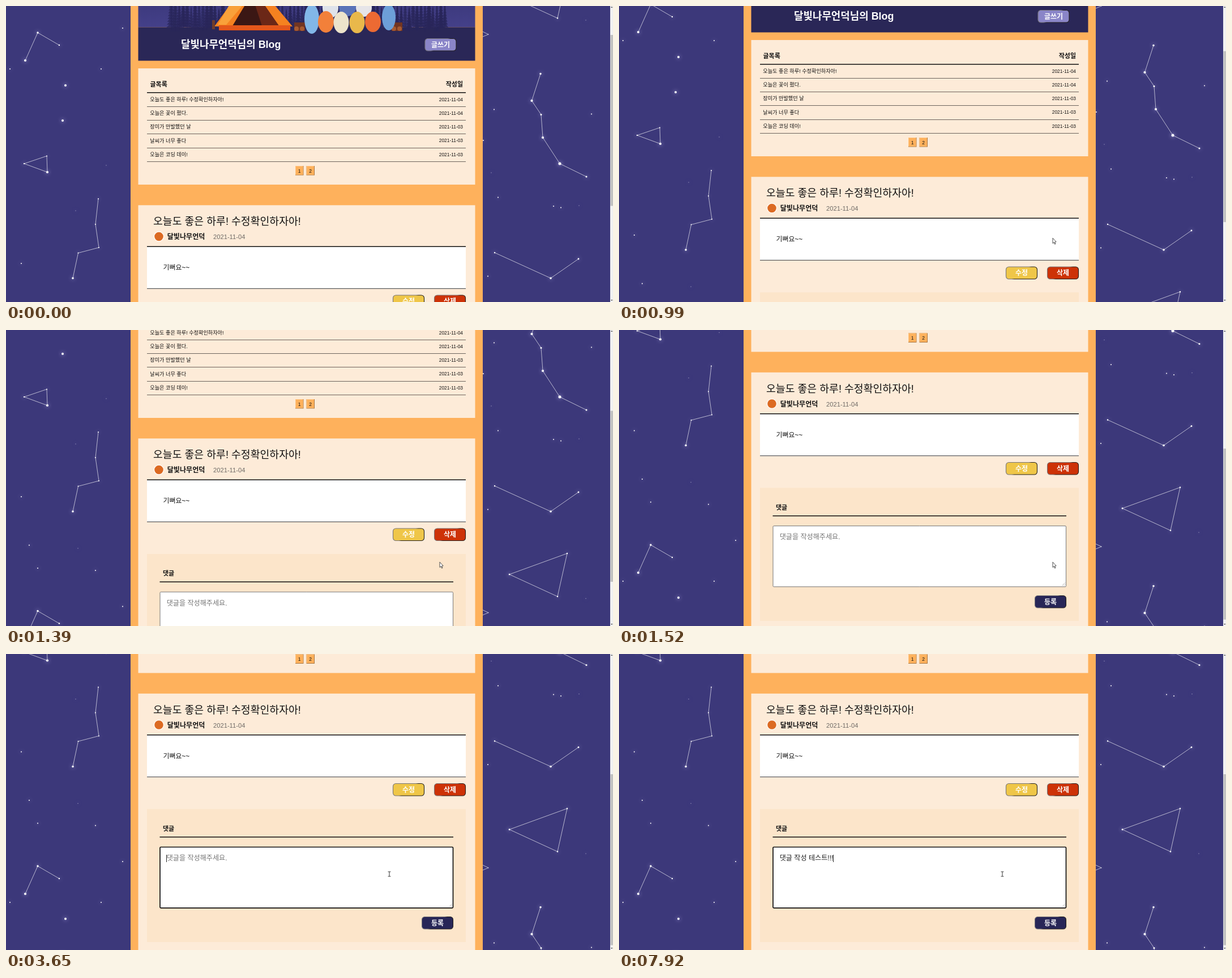
Recreate the animation shown at these times as an HTML page with a canvas. Size 1072x522 px, loop 8 s.

```html
<!DOCTYPE html>
<html lang="ko">
<head>
<meta charset="utf-8">
<title>Blog</title>
<style>
  html, body { margin: 0; width: 100%; height: 100%; overflow: hidden; background: #3c387a; }
  canvas { display: block; }
</style>
</head>
<body>
<canvas id="stage" width="1072" height="522"></canvas>
<script>
const ctx = document.getElementById('stage').getContext('2d');
const W = 1072, H = 522, LOOP = 8000, TILE = 608.5;
const FONT = '"Liberation Sans", "Noto Sans CJK KR", "Noto Sans CJK", sans-serif';
const USER = '달빛나무언덕';
const ORANGE = '#feb15c';

// [time, value] lists with hard steps
const scrollSteps = [[0, 0], [780, 5], [850, 19.7], [920, 38], [980, 50], [1050, 55.8], [1250, 57],
  [1320, 92], [1380, 160], [1450, 240], [1520, 276.5], [1580, 281.5]];
// A trailing underscore marks the syllable still being composed
const typingSteps = [[0, ''], [4100, '대_'], [4430, '댓_'], [4650, '댓그_'], [4920, '댓글_'], [5010, '댓글'],
  [5100, '댓글 '], [5190, '댓글 ㅈ_'], [5290, '댓글 자_'], [5380, '댓글 작_'], [5580, '댓글 잓_'],
  [5720, '댓글 작성_'], [5850, '댓글 작성 '], [6050, '댓글 작성 ㅌ_'], [6120, '댓글 작성 테_'],
  [6320, '댓글 작성 텟_'], [6390, '댓글 작성 테스_'], [6730, '댓글 작성 테슽_'], [6930, '댓글 작성 테스트_'],
  [7460, '댓글 작성 테스트'], [7590, '댓글 작성 테스트!'], [7790, '댓글 작성 테스트!!'], [7920, '댓글 작성 테스트!!!']];
const caretSteps = [[0, false], [2730, true], [3120, false], [3650, true]];
const at = (steps, t) => steps.findLast(([start]) => start <= t)[1];

// Constellations: points are x, y, radius
const constellations = [
  [[34, 96, 2.1], [56, 47, 1.7], [94, 69, 1.2]],
  [[32, 278, 1], [72, 264.5, 1], [73, 293, 2.1], [32, 278, 1]],
  [[163, 340, 1], [158, 385, 1], [164, 426, 1], [127.5, 435.5, 1], [118, 480, 1.8]],
  [[944, 119.5, 1.7], [928.5, 167, 2.1], [945, 191.5, 1.5], [948, 232, 2.1], [978, 278, 2.5], [1025, 301, 1.5]],
  [[863, 435, 1.2], [962, 480, 1.8], [1011, 446, 1.4]],
  [[889, 591, 1.2], [991, 554, 1.2], [974, 630, 1.2], [889, 591, 1.2]],
  [[835, 42, 0], [852, 50, .6], [835, 57, 0]],
];
const loneStars = [[206, 39], [7, 111], [168, 111], [27, 454], [41, 539.5], [56, 580], [158, 584],
  [862, 182.5], [1034, 190.5], [843, 237], [869, 337.5], [967, 353], [980, 355.5], [851, 476.5]];
const faintStars = [[177, 281], [123, 361], [127, 545], [857, 294], [1012, 352], [1024, 25]];
const brightStars = [[105, 140], [100, 202]];

function rect(x, y, w, h, fill) {
  ctx.fillStyle = fill;
  ctx.fillRect(x, y, w, h);
}
function poly(fill, ...points) {
  ctx.beginPath();
  points.forEach(([x, y]) => ctx.lineTo(x, y));
  ctx.closePath();
  ctx.fillStyle = fill;
  ctx.fill();
}
function oval(x, y, rx, ry, fill) {
  ctx.beginPath();
  ctx.ellipse(x, y, rx, ry, 0, 0, 7);
  ctx.fillStyle = fill;
  ctx.fill();
}
// Text placed by its vertical middle
function text(str, x, middle, size, { color = '#111', weight = 400, align = 'left' } = {}) {
  ctx.font = `${weight} ${size}px ${FONT}`;
  ctx.textAlign = align;
  ctx.fillStyle = color;
  ctx.fillText(str, x, middle + size * .37);
}
function button(label, x, y, fill) {
  const w = 56, h = 22.5;
  const bevel = ctx.createLinearGradient(x + w / 2 - 8, y, x + w / 2 + 8, y + h);
  bevel.addColorStop(.45, '#77757a');
  bevel.addColorStop(.55, '#24211f');
  ctx.beginPath();
  ctx.roundRect(x + .5, y + .5, w - 1, h - 1, 5);
  ctx.fillStyle = fill;
  ctx.fill();
  ctx.strokeStyle = bevel;
  ctx.lineWidth = 1.1;
  ctx.stroke();
  text(label, x + w / 2, y + h / 2, 12, { color: '#fff', weight: 700, align: 'center' });
}
function pageButton(label, x) {
  rect(x, 282, 14.5, 16.5, '#a8753f');
  rect(x, 282, 13.5, 15.5, '#ffc583');
  rect(x + 1, 283, 12.5, 14.5, ORANGE);
  text(label, x + 7.2, 290.5, 8.6, { align: 'center' });
}

function drawSky() {
  const star = (x, y, r) => oval(x, y, r, r, '#fff');
  ctx.strokeStyle = 'rgba(255,255,255,.8)';
  ctx.lineWidth = .8;
  for (const points of constellations) {
    ctx.beginPath();
    points.forEach(([x, y]) => ctx.lineTo(x, y));
    ctx.stroke();
  }
  ctx.save();
  ctx.shadowColor = '#c8c4ff';
  ctx.shadowBlur = 7;
  constellations.flat().forEach(p => star(...p));
  loneStars.forEach(([x, y]) => star(x, y, 1));
  brightStars.forEach(([x, y]) => star(x, y, 2));
  ctx.globalAlpha = .5;
  faintStars.forEach(([x, y]) => star(x, y, .7));
  ctx.restore();
}

function drawTrees() {
  let seed = 11;
  const random = () => (seed = seed * 16807 % 2147483647) / 2147483647;
  for (let x = 292; x < 782; x += 7) {
    const top = -22 + random() * 30, foot = 38 + random() * 7;
    ctx.globalAlpha = .6 + random() * .4;
    for (let y = top; y < foot - 4; y += 5) {
      const half = 1.5 + (y - top) * .13;
      poly('#29265a', [x, y - 4], [x + half, y + 5], [x - half, y + 5]);
    }
    rect(x - .6, top, 1.2, foot - top, '#29265a');
  }
  ctx.globalAlpha = 1;
}

function drawBanner() {
  const sky = ctx.createLinearGradient(0, -20, 0, 37);
  sky.addColorStop(0, '#3a3779');
  sky.addColorStop(1, '#444089');
  ctx.save();
  ctx.beginPath();
  ctx.rect(233.5, -300, 595, 396.5);
  ctx.clip();
  rect(233, -300, 596, 337.5, sky);
  rect(233, 37.5, 596, 60, '#2a2757');
  drawTrees();

  // Tent
  poly('#d9480f', [376, 34], [502, 34], [502, 43], [376, 43]);
  poly('#f58220', [400, -8], [469, -8], [506, 36], [368, 36]);
  poly('#3b1714', [426, -8], [452, -8], [482, 35], [400, 35]);
  poly('#6b2717', [438, -8], [452, -8], [482, 35], [452, 35]);
  poly('#f9a13a', [398, -8], [424, -8], [389, 33], [374, 33]);
  rect(376, 34, 126, 8.5, '#e4571b');
  rect(364, 25, 5, 16, '#6e3b2b');

  // Logs
  for (const x of [509, 681]) {
    rect(x, 29, 19, 15, '#713522');
    oval(x + 4, 40, 4, 4, '#a75a31');
    oval(x + 14, 40, 4, 4, '#a75a31');
  }

  // Campers as plain shapes
  oval(573, 3, 14, 18, '#dfe3ea');
  oval(603, 2, 15, 16, '#5a73b8');
  oval(632, 3, 14, 16, '#e6e5e8');
  oval(540, 23, 13, 26, '#82b7e8');
  oval(676, 20, 12, 23, '#6d9fd8');
  oval(565, 28, 14, 19, '#f2803a');
  oval(592, 29, 13.5, 19, '#ece3cb');
  oval(620, 29, 13.5, 19, '#e9b84b');
  oval(648, 28, 14, 18, '#ec6a33');
  ctx.restore();

  text(USER + '님의 Blog', 309, 67.5, 17.9, { color: '#fff', weight: 700 });
  button('글쓰기', 739.5, 57, '#8a85c8');
}

function drawList() {
  const rows = [['오늘도 좋은 하루! 수정확인하자아!', '04'], ['오늘은 꽃이 폈다.', '04'],
    ['장미가 만발했던 날', '03'], ['날씨가 너무 좋다', '03'], ['오늘은 코딩 데이!', '03']];
  rect(233.5, 110, 595, 205, '#fdebd8');
  text('글목록', 254.5, 137.7, 11, { weight: 700 });
  text('작성일', 807, 137.7, 11, { weight: 700, align: 'right' });
  rect(249, 152, 563, 1.5, '#111');
  rows.forEach(([title, day], i) => {
    const y = 164.7 + i * 24.2;
    text(title, 254.3, y, 9.15);
    text('2021-11-' + day, 807, y, 8.4, { align: 'right' });
    rect(249, Math.round(y + 12.3), 563, 1, '#6b645d');
  });
  pageButton('1', 511);
  pageButton('2', 530.5);
}

function drawPost() {
  rect(233.5, 351.3, 595, 600, '#fdebd8');
  text('오늘도 좋은 하루! 수정확인하자아!', 260, 379.3, 18.3, { weight: 300 });
  oval(270, 406.5, 9, 9, '#fff');
  oval(270, 406.5, 7.8, 7.8, '#dc6a22');
  text(USER, 284.7, 406.8, 12.1, { weight: 700 });
  text('2021-11-04', 366, 407, 11.2, { color: '#6f6a66' });
  rect(249, 424, 563, 75, '#fff');
  rect(249, 423.5, 563, 1.5, '#111');
  rect(249, 497.8, 563, 1, '#333');
  text('기뻐요~~', 277.5, 460.7, 11.9);
  button('수정', 683, 509.5, '#efc648');
  button('삭제', 756, 509.5, '#cd3207');
}

function drawComment(t) {
  const focused = t >= 2730, left = 283.7, middle = 641.5, size = 12.1;
  const typed = at(typingSteps, t), value = typed.replace('_', '');
  rect(249, 555, 563, 234.5, '#fce5ca');
  text('댓글', 277, 589.2, 11, { weight: 700 });
  rect(271.5, 603.5, 518.5, 1.5, '#111');

  ctx.beginPath();
  ctx.roundRect(272, 622, 517.5, 107.3, 1.5);
  ctx.fillStyle = '#fff';
  ctx.fill();
  ctx.strokeStyle = focused ? '#101010' : '#767676';
  ctx.lineWidth = focused ? 1.7 : 1;
  ctx.stroke();
  ctx.beginPath();
  for (const d of [2.5, 5.5]) {
    ctx.moveTo(788 - d, 727.5);
    ctx.lineTo(788, 727.5 - d);
  }
  ctx.strokeStyle = '#999';
  ctx.lineWidth = .7;
  ctx.stroke();

  if (value) text(value, left, middle, size, { color: '#222' });
  else text('댓글을 작성해주세요.', left, middle, size, { color: '#757575' });
  const width = ctx.measureText(value).width;
  if (typed.endsWith('_')) {
    const before = ctx.measureText(value.slice(0, -1)).width;
    rect(left + before, 647.5, width - before, .9, '#333');
  }
  if (at(caretSteps, t)) rect(Math.floor(left + width), 635.5, 1, 13, '#222');
  button('등록', 734, 744.5, '#282657');
}

function drawScrollbar(scroll) {
  rect(1067, 0, 5, H, '#f1f1f1');
  rect(1067.5, 51 + scroll * .572, 4.5, 301.5, '#c1c1c1');
  poly('#505050', [1068, 3], [1071.5, 3], [1069.7, 1]);
  poly('#505050', [1068, 518], [1071.5, 518], [1069.7, 520]);
}

function drawArrow(x, y) {
  ctx.save();
  ctx.translate(x, y);
  poly('#fff', [0, 0], [0, 9.3], [2.1, 7.4], [3.6, 10.8], [5, 10.2], [3.5, 6.9], [6.2, 6.6]);
  ctx.strokeStyle = '#222';
  ctx.lineWidth = .8;
  ctx.stroke();
  ctx.restore();
}
function drawBeam(x, y) {
  rect(x - .5, y - 4, 1, 8, '#333');
  for (const dy of [-4.5, 3.7]) rect(x - 2.5, y + dy, 5, .9, '#333');
}
function drawCursor(t) {
  // Five quick steps in from the lower right, later six steps across the text box
  const stepped = (start, end, count) =>
    Math.min(count - 1, Math.floor((t - start) / (end - start) * (count - 1) + .001)) / (count - 1);
  if (t < 190) return;
  if (t < 2240) {
    const away = (1 - stepped(190, 450, 5)) ** 2;
    drawArrow(766 + 224 * away, 409.3 + 102 * away);
  } else {
    const away = (1 - stepped(2240, 2730, 6)) ** 2 * .7;
    drawBeam(677 + 88 * away, 388 + 24 * away);
  }
}

function draw(t) {
  const scroll = at(scrollSteps, t);
  rect(0, 0, W, H, '#3c387a');
  ctx.save();
  ctx.translate(0, -scroll);
  for (const shift of [-TILE, 0, TILE]) {
    ctx.save();
    ctx.translate(0, shift);
    drawSky();
    ctx.restore();
  }
  rect(220, 0, 622, 1000, ORANGE);
  drawBanner();
  drawList();
  drawPost();
  drawComment(t);
  ctx.restore();
  drawScrollbar(scroll);
  drawCursor(t);
}

function frame() {
  draw(performance.now() % LOOP);
  requestAnimationFrame(frame);
}
frame();
</script>
</body>
</html>
```
